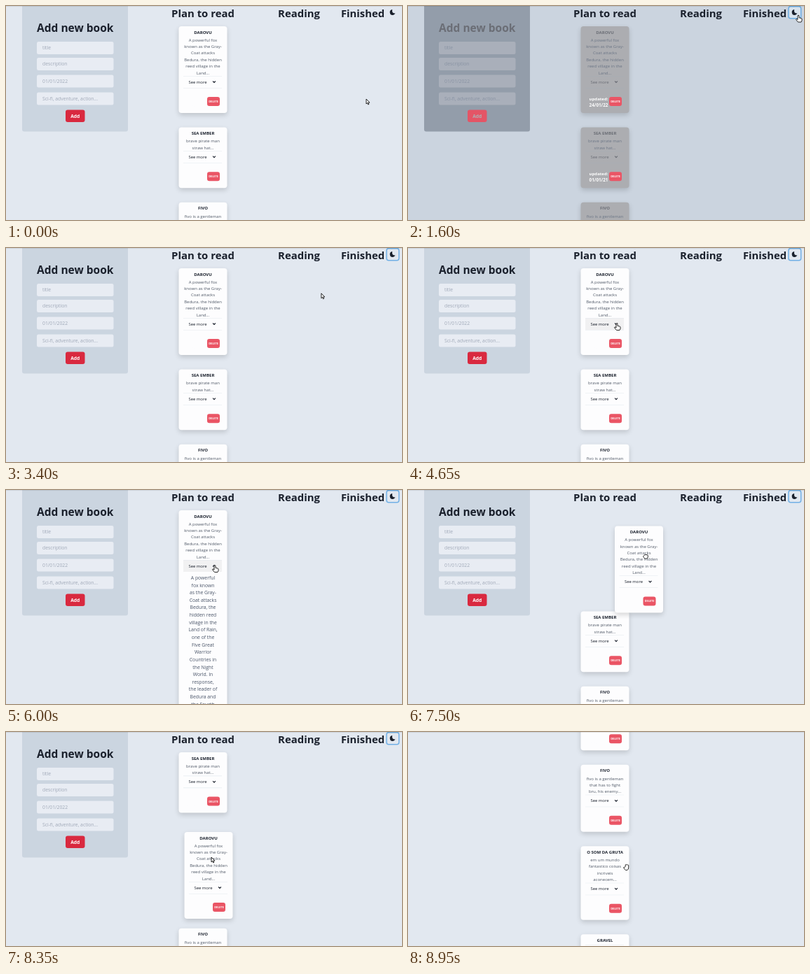
An HTML page with a canvas for the animation above (9 s loop, 565x306 px).

```html
<!DOCTYPE html>
<html lang="en">
<head>
<meta charset="utf-8">
<title>Book board</title>
<style>
html, body { margin: 0; width: 100%; height: 100%; overflow: hidden; background: #e2e8f0; }
canvas { display: block; width: 565px; height: 306px; }
</style>
</head>
<body>
<canvas id="stage"></canvas>
<script>
const W = 565, H = 306, LOOP = 9000, STEP = 50;
const canvas = document.getElementById('stage');
const ctx = canvas.getContext('2d');
const dpr = window.devicePixelRatio || 1;
canvas.width = W * dpr;
canvas.height = H * dpr;

const FONT = '"Open Sans", "Noto Sans", sans-serif';
const INK = '#1a202c';
const GAP = 20.6, LINE = 9.35;
const CARD_X = 246.5, CARD_W = 69, MID = 281;

const cards = [
  { title: 'DAROVU', date: '24/01/22',
    lines: ['A powerful fox', 'known as the Gray-', 'Coat attacks', 'Bedura, the hidden', 'reed village in the', 'Land...'] },
  { title: 'SEA EMBER', date: '01/01/21', lines: ['brave pirate man', 'straw hat...'] },
  { title: 'FIVO', lines: ['fivo is a gentleman', 'that has to fight', 'bru, his enemy...'] },
  { title: 'O SOM DA GRUTA', lines: ['em um mundo', 'fantastico coisas', 'incriveis', 'aconecem...'] },
  { title: 'GRAVEL', lines: [] }
];
const story = ['A powerful', 'fox known', 'as the Gray-', 'Coat attacks', 'Bedura, the', 'hidden reed',
  'village in the', 'Land of Rain,', 'one of the', 'Five Great', 'Warrior', 'Countries in', 'the Night',
  'World. In', 'response,', 'the leader of', 'Bedura and', 'the Fourth'];
const STORY_H = 300;

const rowTop = c => 14.9 + c.lines.length * LINE;
const cardHeight = c => rowTop(c) + 53;

// Pointer position over time: [ms, x, y]
const pointerPath = [
  [0, 514, 133], [50, 514, 133], [550, 557, 13], [1750, 557, 13], [2250, 56, 205], [2350, 56, 205],
  [2700, 557, 13], [3150, 557, 13], [3700, 309, 133], [3900, 309, 133], [4250, 270, 111],
  [4650, 298, 107.5], [6050, 298, 107.5], [6900, 286, 66], [7150, 286, 66], [7500, 339.5, 95],
  [7700, 378, 125], [7900, 334, 176], [8050, 293, 179], [8350, 293, 179], [8950, 312, 193]
];
const dragPath = [
  [7150, 0, 0], [7500, 48.5, 22.5], [7700, 90, 55], [7900, 48, 111], [8050, 8, 114],
  [8350, 8, 114], [8650, 0, 107.3]
];
const pointerKinds = [
  [0, 'arrow'], [450, 'hand'], [1800, 'arrow'], [2650, 'hand'], [3200, 'arrow'], [3650, 'grab'],
  [4050, 'hand'], [6250, 'grab'], [6950, 'fist'], [8300, 'arrow'], [8650, 'grab']
];
const pointers = {
  arrow: new Path2D('M0 0v7l1.6-1.5 1.1 2.5 1.1-.5-1.1-2.4h2.2z'),
  hand: new Path2D('M-1 .8q1-1.4 2 0v3l3 .7q1 .3 1 1.3v2l-1 2.2h-4.5l-3-3.6q.3-1.4 1.5-.7l1 .9z'),
  grab: new Path2D('M-1.8-.5v-2.6q.6-.8 1.1 0q.6-1.2 1.2 0q.7-.7 1.2.3q.8-.4 1 .5v3.2q0 3-2 3.6h-2.2q-1-.5-3-3.6q.2-1 1.2-.4z'),
  fist: new Path2D('M-2.6-1.6q1.2-1.4 2.6-.7q1.6-.6 2.8.8v2.3q0 2.4-2.4 2.4h-1.2q-1.4 0-2.2-1.6l-.9-1.6z')
};

const clamp = v => Math.max(0, Math.min(1, v));
const ramp = (t, from, span) => {
  const u = clamp((t - from) / span);
  return u * u * (3 - 2 * u);
};
const between = (t, a, b) => t >= a && t < b;

// Smooth curve through the keys, at rest wherever a key repeats
function slope(keys, i, axis) {
  const prev = keys[i - 1], key = keys[i], next = keys[i + 1];
  if (!prev || !next || prev[axis] === key[axis] || next[axis] === key[axis]) return 0;
  return (next[axis] - prev[axis]) / (next[0] - prev[0]);
}
function follow(keys, t) {
  const last = keys.length - 1;
  if (t <= keys[0][0]) return keys[0].slice(1);
  if (t >= keys[last][0]) return keys[last].slice(1);
  const i = keys.findIndex(k => k[0] > t) - 1;
  const a = keys[i], b = keys[i + 1], span = b[0] - a[0];
  const u = (t - a[0]) / span, v = 1 - u;
  return [1, 2].map(n =>
    v * v * (1 + 2 * u) * a[n] + u * u * (3 - 2 * u) * b[n] +
    span * u * v * (v * slope(keys, i, n) - u * slope(keys, i + 1, n)));
}

let dark = 0;
function tone(light, night) {
  const part = (hex, i) => parseInt(hex.slice(i, i + 2), 16);
  const mix = i => Math.round(part(light, i) + (part(night, i) - part(light, i)) * dark);
  return `rgb(${mix(1)},${mix(3)},${mix(5)})`;
}
function box(x, y, w, h, r, fill) {
  ctx.beginPath();
  ctx.roundRect(x, y, w, h, r);
  ctx.fillStyle = fill;
  ctx.fill();
}
// y is the middle of the capitals
function text(s, x, y, size, color, weight = 400, align = 'center') {
  ctx.font = `${weight} ${size}px ${FONT}`;
  ctx.textAlign = align;
  ctx.fillStyle = color;
  ctx.fillText(s, x, y + size * 0.36);
}

function drawForm() {
  box(23, -5, 151, 184.5, 3, tone('#cbd5e0', '#2d3748'));
  text('Add new book', 98.7, 31.5, 15.5, tone(INK, '#ffffff'), 700);
  const fields = [['title', 60], ['description', 83], ['01/01/2022', 107.5], ['Sci-fi, adventure, action...', 132.5]];
  for (const [label, y] of fields) {
    box(44, y - 9, 109.5, 18, 2.5, tone('#e8ecf3', '#353f50'));
    text(label, 52, y, 6.8, tone('#a0a9b8', '#5f6a7b'), 400, 'left');
  }
  box(85, 148.5, 27.5, 17.5, 3, tone('#d9293f', '#f9a5ae'));
  text('Add', 98.7, 157.3, 6.7, tone('#ffffff', INK), 700);
}

function drawToggle(t) {
  if (between(t, 450, 1800) || between(t, 2650, 3200)) {
    box(543, 0.5, 17.5, 17.5, 3, tone('#edf2f7', '#b5c8dc'));
  }
  if (t >= 1400) {
    ctx.beginPath();
    ctx.roundRect(543, 0.7, 17.7, 17, 3);
    ctx.strokeStyle = 'rgba(66,153,225,.7)';
    ctx.lineWidth = 1.5;
    ctx.stroke();
  }
  ctx.save();
  ctx.translate(551.7, 9);
  ctx.beginPath();
  if (dark < 0.5) {
    ctx.fillStyle = INK;
    ctx.arc(0, 0, 4, -1.7, 0.35, true);
    ctx.quadraticCurveTo(-1.8, 2, -0.5, -3.97);
    ctx.fill();
  } else {
    ctx.fillStyle = ctx.strokeStyle = '#ffffff';
    ctx.arc(0, 0, 2, 0, 7);
    ctx.fill();
    ctx.lineWidth = 0.9;
    ctx.beginPath();
    for (let i = 0; i < 8; i++) {
      ctx.rotate(Math.PI / 4);
      ctx.moveTo(3, 0);
      ctx.lineTo(4.3, 0);
    }
    ctx.stroke();
  }
  ctx.restore();
}

function drawChevron(x, y, turn) {
  ctx.save();
  ctx.translate(x, y);
  ctx.rotate(turn * Math.PI);
  ctx.beginPath();
  ctx.moveTo(-1.9, -1);
  ctx.lineTo(0, 1);
  ctx.lineTo(1.9, -1);
  ctx.strokeStyle = tone(INK, '#ffffff');
  ctx.lineWidth = 1.1;
  ctx.stroke();
  ctx.restore();
}

function drawStory(top, height, alpha) {
  ctx.save();
  ctx.beginPath();
  ctx.rect(CARD_X, top, CARD_W, height);
  ctx.clip();
  ctx.globalAlpha = alpha;
  story.forEach((s, i) => text(s, MID, top + 8.5 + i * 10.63, 6.8, tone('#4a5568', '#a0aec0')));
  ctx.restore();
}

function drawCard(card, dx, top, { hover = false, grow = 0, fade = 0, turn = 0 } = {}) {
  const extra = grow * STORY_H;
  const height = cardHeight(card) + extra;
  const row = top + rowTop(card);
  const bottom = top + height;
  ctx.save();
  ctx.translate(dx, 0);

  ctx.save();
  ctx.shadowColor = 'rgba(0,0,0,.16)';
  ctx.shadowBlur = 7 * dpr;
  ctx.shadowOffsetY = 3 * dpr;
  box(CARD_X, top, CARD_W, height, 4, tone('#fdfdfe', '#171923'));
  ctx.restore();

  text(card.title, MID, top + 8.5, 6, tone(INK, '#ffffff'), 700);
  card.lines.forEach((s, i) => text(s, MID, top + 19.6 + i * LINE, 6, tone('#4f5866', '#a0aec0')));

  if (hover) box(253, row, 55, 17, 0, tone('#f1f1f2', '#2a2d38'));
  const rule = tone('#e4e9f0', '#3a3e49');
  box(253, row, 55, 0.6, 0, rule);
  box(253, row + 17 + extra, 55, 0.6, 0, rule);
  text('See more', 260.5, row + 8.6, 5.9, tone(INK, '#ffffff'), 400, 'left');
  drawChevron(297, row + 8.5, turn);
  if (grow > 0) drawStory(row + 17, extra, fade);

  if (card.date) {
    const shade = tone('#fdfdfe', '#ffffff');
    text('updated:', 272, bottom - 20.5, 6, shade, 700);
    text(card.date, 272, bottom - 11.5, 6.3, shade, 700);
  }
  box(287, bottom - 23, 18, 13, 3, '#ea5565');
  text('DELETE', 296, bottom - 16.4, 3.8, '#ffffff', 700);
  ctx.restore();
}

function drawCards(t) {
  const closing = ramp(t, 6050, 300);
  const grow = ramp(t, 4850, 400) * (1 - closing);
  const fade = ramp(t, 4850, 450) * (1 - closing);
  const turn = ramp(t, 4850, 200) * (1 - ramp(t, 6050, 200));
  const [dx, dy] = follow(dragPath, t);
  const slot = cardHeight(cards[0]) + GAP;
  const lift = ramp(t, 7550, 200) * slot;
  const back = ramp(t, 7850, 200) * slot;

  let top = 29 + slot + grow * STORY_H;
  cards.slice(1).forEach((card, i) => {
    drawCard(card, 0, top - lift + (i > 0 ? back : 0));
    top += cardHeight(card) + GAP;
  });
  drawCard(cards[0], dx, 29 + dy, { hover: between(t, 4050, 6250), grow, fade, turn });
}

function drawPointer(t) {
  const [x, y] = follow(pointerPath, t);
  const kind = pointerKinds.filter(k => k[0] <= t).pop()[1];
  ctx.save();
  ctx.translate(x, y);
  ctx.lineJoin = 'round';
  ctx.lineWidth = 0.9;
  ctx.fillStyle = '#ffffff';
  ctx.strokeStyle = '#111111';
  ctx.fill(pointers[kind]);
  ctx.stroke(pointers[kind]);
  ctx.restore();
}

function draw(t) {
  dark = ramp(t, 1500, 250) * (1 - ramp(t, 3100, 250));
  ctx.setTransform(dpr, 0, 0, dpr, 0, 0);
  ctx.fillStyle = tone('#e2e8f0', '#a0aec0');
  ctx.fillRect(0, 0, W, H);

  ctx.save();
  ctx.translate(0, -234 * ramp(t, 8600, 350));
  drawForm();
  text('Plan to read', MID, 10.5, 14.9, INK, 700);
  text('Reading', 418, 10.5, 14.9, INK, 700);
  text('Finished', 509, 10.5, 14.8, INK, 700);
  drawToggle(t);
  drawCards(t);
  ctx.restore();

  ctx.fillStyle = 'rgba(0,0,0,.12)';
  ctx.fillRect(0, 0, W, 0.8);
  drawPointer(t);
}

const start = performance.now();
function tick() {
  const t = (performance.now() - start) % LOOP;
  draw(Math.floor(t / STEP) * STEP);
  requestAnimationFrame(tick);
}
tick();
</script>
</body>
</html>
```
